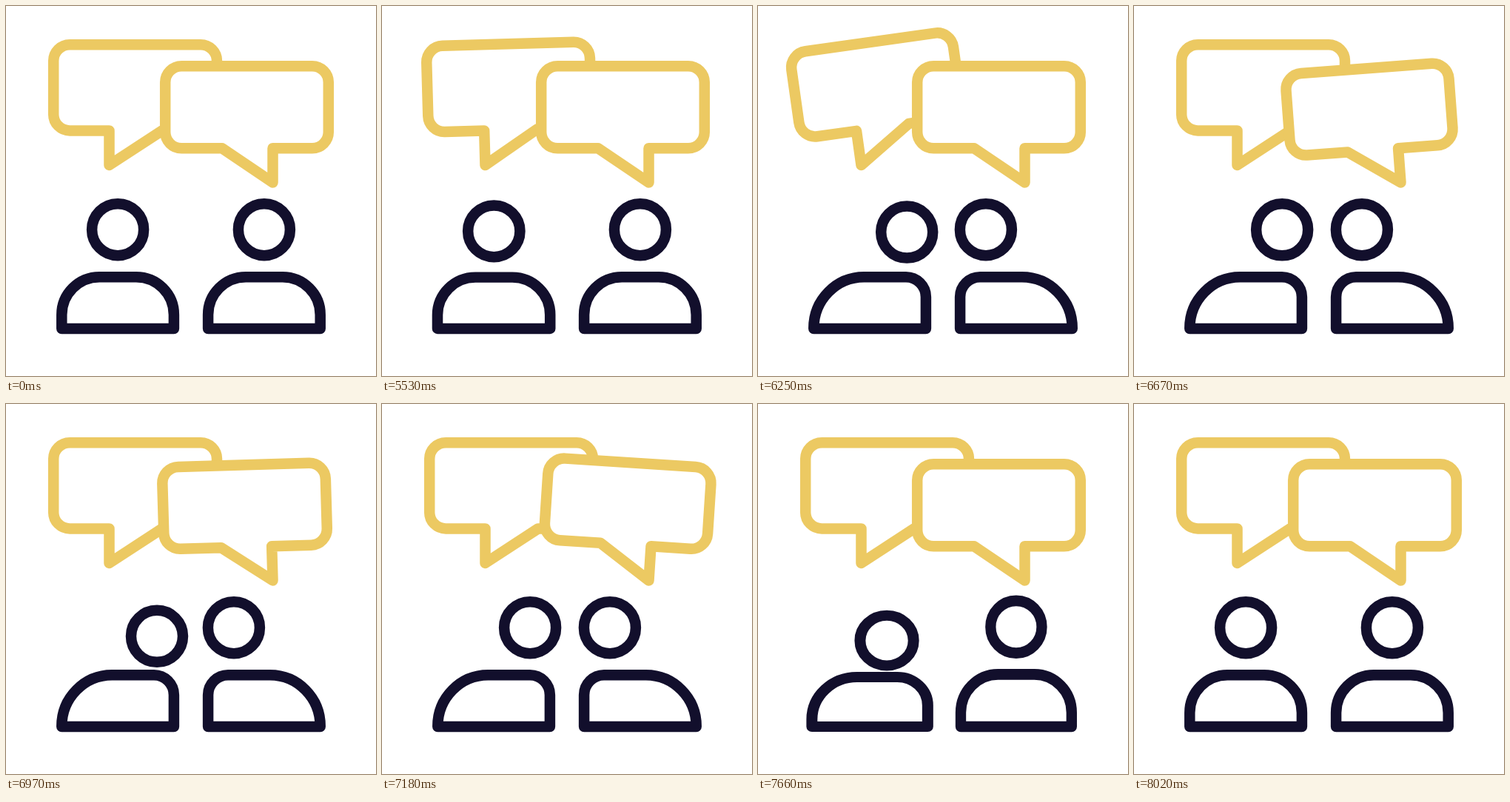
Recreate the animation shown at these times as an HTML page with a canvas. Size 500 px wide and 500 px high, loop 8050 ms.

```html
<!DOCTYPE html>
<html lang="en">
<head>
<meta charset="utf-8">
<title>Conversation</title>
<style>
html, body { margin: 0; width: 100%; height: 100%; overflow: hidden; background: #fff; }
canvas { display: block; width: 100vmin; height: 100vmin; }
</style>
</head>
<body>
<canvas id="stage" width="500" height="500"></canvas>
<script>
const ctx = document.getElementById('stage').getContext('2d');
const GOLD = '#ecc962', NAVY = '#120f2c';
const LOOP = 8050, START = 5530, STEP = 30;

const mix = (a, b, p) => a + (b - a) * p;
const clamp = p => Math.min(1, Math.max(0, p));
const ease = p => (1 - Math.cos(Math.PI * clamp(p))) / 2;

// Eases from each value to the next as u passes the times
const sway = (u, times, values) => values.slice(1).reduce((v, next, i) =>
  mix(v, next, ease((u - times[i]) / (times[i + 1] - times[i]))), values[0]);

const swing = u => sway(u, [-15, 230, 480, 675, 930], [0, -20, 14.5, -10, 0]);
const bounce = (u, peak, rebound) => sway(u, [0, 150, 320, 560], [0, peak, rebound, 0]);
const turn = u => ease(u / 340) ** 1.4;

// Two equal nods
const nod = u => (1 - Math.cos(clamp(u / 960) * 4 * Math.PI)) / 2;

// Turn inwards at one time, back outwards at another
function poseAt(t, turnIn, turnOut) {
  const u = t - (t < turnOut ? turnIn : turnOut);
  return {
    side: turn(t - turnIn) - turn(t - turnOut),
    dip: bounce(u, 22, -1),
    squash: bounce(u, .043, -.012)
  };
}

function bubble(x, y, w, h, tail, pivot, angle) {
  const r = 22, right = x + w, low = y + h;
  ctx.save();
  ctx.translate(...pivot);
  ctx.rotate(angle * Math.PI / 180);
  ctx.translate(-pivot[0], -pivot[1]);
  ctx.beginPath();
  ctx.moveTo(x + r, y);
  ctx.arcTo(right, y, right, low, r);
  ctx.arcTo(right, low, x, low, r);
  ctx.lineTo(tail[1], low);
  ctx.lineTo(...pivot);
  ctx.lineTo(tail[0], low);
  ctx.arcTo(x, low, x, y, r);
  ctx.arcTo(x, y, right, y, r);
  ctx.closePath();
  ctx.fillStyle = '#fff';
  ctx.fill();
  ctx.strokeStyle = GOLD;
  ctx.stroke();
  ctx.restore();
}

// Drawn around x = 0, facing right; dir = -1 mirrors
function person(cx, dir, reach, pose, tilt) {
  const { side, dip, squash } = pose;
  const half = 75.8, top = -69.7;
  const back = mix(51, 68, side), backY = mix(51, 69, side), front = mix(51, 27, side);
  ctx.strokeStyle = NAVY;
  ctx.save();
  ctx.translate(cx, 436);
  ctx.scale(dir, 1);

  ctx.save();
  ctx.scale(1 + squash, 1 - 1.2 * squash);
  ctx.beginPath();
  ctx.moveTo(-half, 0);
  ctx.ellipse(back - half, backY + top, back, backY, 0, Math.PI, Math.PI * 1.5);
  ctx.arc(half - front, front + top, front, -Math.PI / 2, 0);
  ctx.lineTo(half, 0);
  ctx.closePath();
  ctx.stroke();
  ctx.restore();

  ctx.translate(reach * side + 5 * tilt, -133.8 + dip + 15 * tilt);
  ctx.scale(1 + squash, 1 - squash);
  ctx.beginPath();
  ctx.arc(0, 0, 35, 0, Math.PI * 2);
  ctx.stroke();
  ctx.restore();
}

function draw(t) {
  ctx.clearRect(0, 0, 500, 500);
  ctx.lineWidth = 14.5;
  ctx.lineJoin = 'round';
  bubble(64.2, 52.2, 220.8, 116.2, [139.5, 211], [139.5, 215], swing(t - 5500));
  bubble(215.2, 81.3, 220.6, 110.9, [292, 360.5], [360.5, 238.5], swing(t - 6610));
  person(151.1, 1, 49, poseAt(t, 5500, 7460), nod(t - 6175));
  person(348.9, -1, 41, poseAt(t, 5530, 7320), 0);
}

const begin = performance.now();
function tick() {
  const t = (performance.now() - begin) % LOOP;
  draw(t < START ? 0 : START + Math.floor((t - START) / STEP) * STEP);
  requestAnimationFrame(tick);
}
tick();
</script>
</body>
</html>
```
